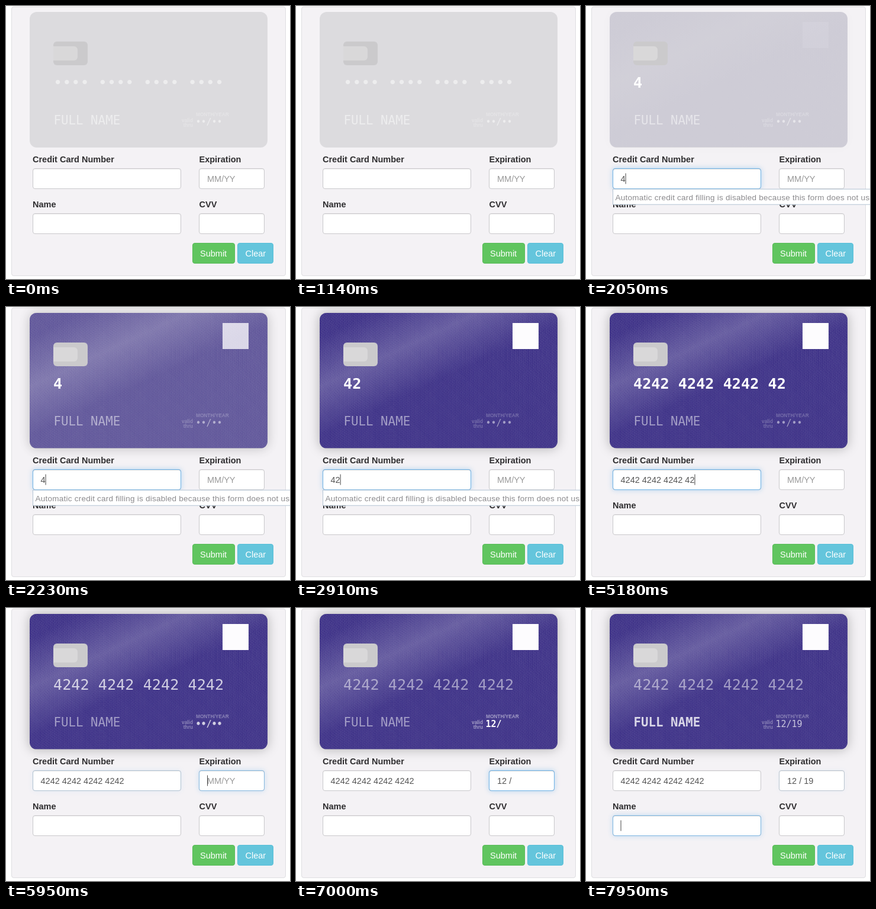
Write an HTML page that moves like this. It is 480 px wide and 461 px high and loops after 8000 ms.

```html
<!DOCTYPE html>
<html lang="en">
<head>
<meta charset="utf-8">
<title>Card form</title>
<style>
  html, body { margin: 0; width: 100%; height: 100%; overflow: hidden; background: #fff; }
  #stage { position: absolute; left: 0; top: 0; width: 480px; height: 461px; overflow: hidden; }
  #stage > *, #card > * { position: absolute; box-sizing: border-box; }
  .panel { left: 9px; top: 1px; width: 464px; height: 455px; background: #f4f2f5; border: 1px solid #dfdee1; border-radius: 4px; }
  #card { left: 40px; top: 10px; width: 402px; height: 229px; border-radius: 12px; background: #dcdbde; }
  #skin {
    left: 0; top: 0; width: 350px; height: 199.4px; transform: scale(1.1486); transform-origin: 0 0;
    border-radius: 10px; background-color: #30237f; box-shadow: 0 0 18px rgba(0,0,0,.28);
    --rise: #fff0 1px, rgba(255,255,255,.02) 2px, rgba(255,255,255,.03) 3px, rgba(255,255,255,.04) 4px;
    background-image:
      repeating-linear-gradient(45deg, var(--rise)),
      repeating-linear-gradient(135deg, rgba(255,255,255,.04) 1px, #fff0 2px, rgba(255,255,255,.03) 3px, rgba(255,255,255,.02) 4px),
      repeating-linear-gradient(90deg, var(--rise)),
      repeating-linear-gradient(210deg, var(--rise)),
      repeating-radial-gradient(circle at 30% 30%, var(--rise)),
      linear-gradient(-25deg, #fff0 50%, rgba(255,255,255,.2) 70%, #fff0 90%);
  }
  .chip { left: 40px; top: 50px; width: 58px; height: 40px; border-radius: 6px; background: #cbcacc; }
  .chip::before { content: ""; position: absolute; left: 0; top: 8px; width: 41px; height: 24px; border-radius: 0 6px 6px 0; background: #d9d8d9; }
  #badge { left: 326px; top: 17px; width: 44px; height: 44px; background: #fdfcfe; }
  .input { height: 35px; background: #fff; border: 1px solid #c9c8cb; border-radius: 4px; box-shadow: inset 0 1px 1px rgba(0,0,0,.07); }
  .glow { position: absolute; inset: -1px; border: 1px solid #70b3e6; border-radius: 4px; box-shadow: inset 0 1px 1px rgba(0,0,0,.07), 0 0 8px rgba(102,175,233,.45); opacity: 0; }
  .button { top: 400px; height: 35px; border: 1px solid; border-radius: 4px; }
  svg { left: 0; top: 0; font: 14.5px "Liberation Sans", Arial, sans-serif; }
  .label { font-weight: bold; fill: #2f2e30; }
  .field { fill: #555; }
  .mono { font-family: "DejaVu Sans Mono", monospace; fill: #fff; }
  .tiny { font-weight: bold; font-size: 8.3px; fill: #fff; fill-opacity: .5; }
  text { white-space: pre; }
</style>
</head>
<body>
<div id="stage">
  <div class="panel"></div>
  <div id="card">
    <div id="skin"></div>
    <div class="chip"></div>
    <div id="badge"></div>
  </div>
  <div class="input" style="left:45px;top:274px;width:251px"><div class="glow" id="numberGlow"></div></div>
  <div class="input" style="left:326px;top:274px;width:111px"><div class="glow" id="expiryGlow"></div></div>
  <div class="input" style="left:45px;top:350px;width:251px"><div class="glow" id="nameGlow"></div></div>
  <div class="input" style="left:326px;top:350px;width:111px"></div>
  <div class="button" style="left:315px;width:72px;background:#60c55f;border-color:#58bb58"></div>
  <div class="button" style="left:391px;width:61px;background:#64c5dc;border-color:#57bfd8"></div>
  <svg width="480" height="461">
    <text class="mono" id="number" x="80" y="138" font-size="25.2"></text>
    <text class="mono" id="name" x="80.5" y="199.5" font-size="20.8">FULL NAME</text>
    <g id="expiryGroup">
      <text class="tiny" x="321" y="185.5">MONTH/YEAR</text>
      <text class="tiny" x="316" y="196" text-anchor="end">valid</text>
      <text class="tiny" x="316" y="204" text-anchor="end">thru</text>
      <text class="mono" id="expiry" x="320.5" y="200.5" font-size="15"></text>
    </g>
    <text class="label" x="45" y="263.5">Credit Card Number</text>
    <text class="label" x="326.5" y="263.5">Expiration</text>
    <text class="label" x="45" y="340">Name</text>
    <text class="label" x="326.5" y="340">CVV</text>
    <text class="field" id="numberField" x="58.5" y="296.5"></text>
    <text class="field" id="expiryField" x="340" y="296.5"></text>
    <text x="328" y="423" fill="#fff">Submit</text>
    <text x="404.5" y="423" fill="#fff">Clear</text>
    <rect id="caret" width="1" height="18" fill="#444"/>
    <g id="hint">
      <rect x="45.5" y="309.2" width="460" height="26" fill="#fff" stroke="#b3c3d3"/>
      <text x="49.5" y="327.5" font-size="13.5" letter-spacing=".24" fill="#8b8a8d">Automatic credit card filling is disabled because this form does not use a secure connection</text>
    </g>
  </svg>
</div>
<script>
const LOOP = 8000, FADE = 260, GLOW = 180, BLINK = 330, IDENTIFY = 2029;
const FOCUS = { number: [1350, 5820], expiry: [5820, 7800], name: [7800, 9000] };
const NUMBER_KEYS = [2005, 2700, 3150, 3380, 3600, 3780, 3960, 4130, 4360, 4520, 4680, 4850, 5030, 5180, 5340, 5500];
const EXPIRY_KEYS = [6350, 6650, 7050, 7350];
const EXPIRY_STEPS = ["", "1", "12 / ", "12 / 1", "12 / 19"];
const HINT = [2005, 3380];
const EVENTS = [...NUMBER_KEYS, ...EXPIRY_KEYS, ...Object.values(FOCUS).map(span => span[0])];

const $ = id => document.getElementById(id);
const ramp = (t, start, length) => Math.min(1, Math.max(0, (t - start) / length));
const within = (t, [start, end]) => t >= start && t < end;
const pulse = (t, [start, end], length) => ramp(t, start, length) - ramp(t, end, length);
const typed = (t, keys) => keys.filter(key => key <= t).length;
const textWidth = text => [...text].reduce((sum, c) => sum + (/\d/.test(c) ? .556 : .278), 0) * 14.5;

function setText(id, text) {
  if ($(id).textContent !== text) $(id).textContent = text;
}

function render(t) {
  const digits = "4242424242424242".slice(0, typed(t, NUMBER_KEYS));
  let number = digits.replace(/(\d{4})/g, "$1 ");
  if (digits.length === 16) number = number.trim();
  const expiry = EXPIRY_STEPS[typed(t, EXPIRY_KEYS)];

  setText("number", number.trim() || "•••• •••• •••• ••••");
  setText("numberField", number);
  setText("expiry", expiry.replace(/ /g, "") || "••/••");
  setText("expiryField", expiry || "MM/YY");
  $("expiryField").style.fill = expiry ? "#555" : "#999";

  for (const [id, span] of Object.entries(FOCUS)) {
    const shown = id === "expiry" ? "expiryGroup" : id;
    $(shown).style.opacity = .5 + .5 * pulse(t, span, FADE);
    $(id).style.fontWeight = within(t, span) ? "bold" : "normal";
    $(id + "Glow").style.opacity = pulse(t, span, GLOW);
  }

  const identified = ramp(t, IDENTIFY, FADE);
  $("skin").style.opacity = identified;
  $("badge").style.opacity = identified;
  $("hint").style.display = within(t, HINT) ? "" : "none";

  const spots = {
    number: [58.5 + textWidth(number), 282.5],
    expiry: [340 + textWidth(expiry), 282.5],
    name: [58.5, 358.5]
  };
  const active = Object.keys(FOCUS).find(id => within(t, FOCUS[id]));
  const lastEvent = Math.max(...EVENTS.filter(time => time <= t));
  const lit = active && Math.floor((t - lastEvent) / BLINK) % 2 === 0;
  $("caret").style.display = lit ? "" : "none";
  if (lit) {
    $("caret").setAttribute("x", spots[active][0]);
    $("caret").setAttribute("y", spots[active][1]);
  }
}

const begin = performance.now();
function tick() {
  render((performance.now() - begin) % LOOP);
  requestAnimationFrame(tick);
}
tick();
</script>
</body>
</html>
```
